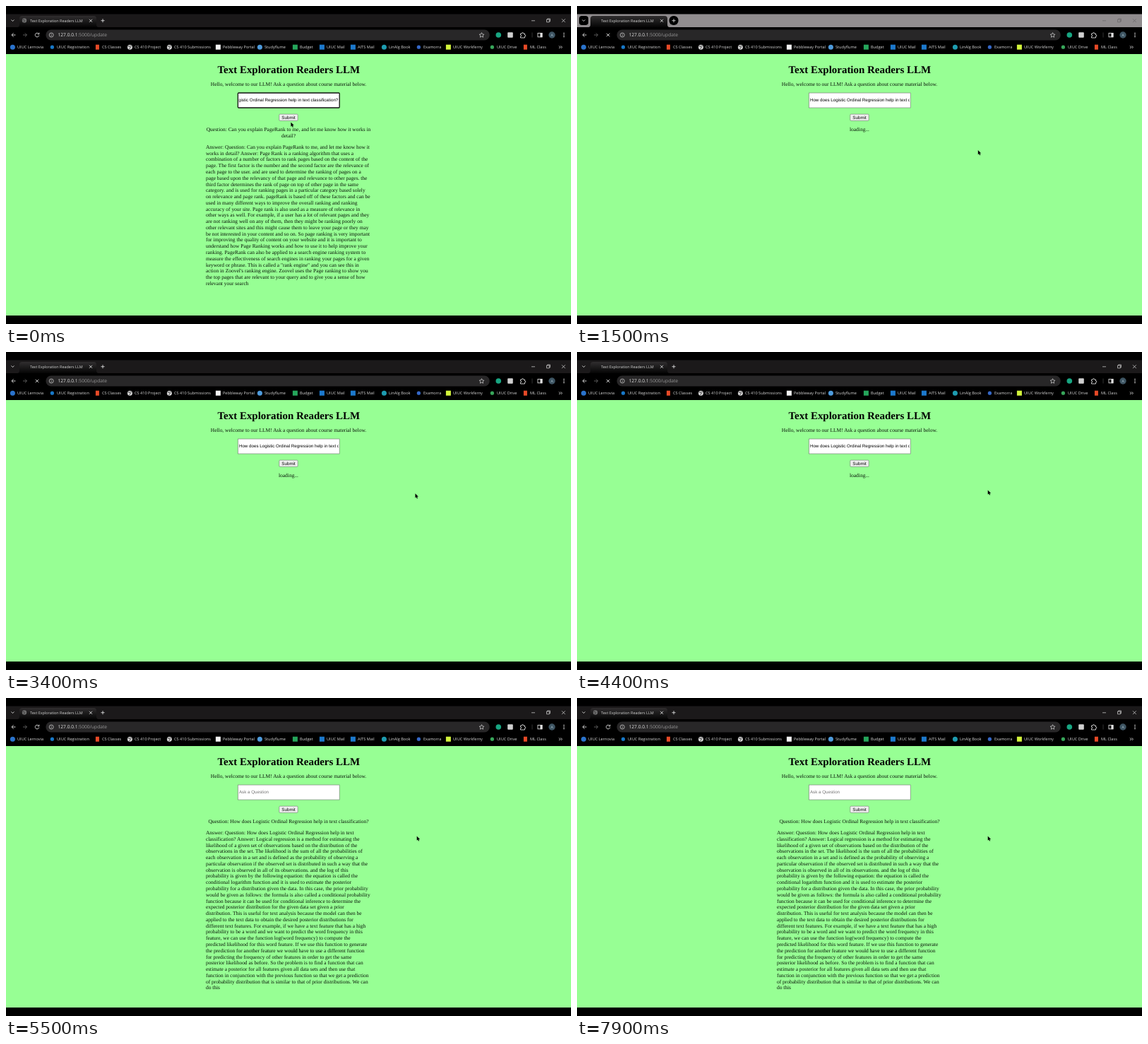
Recreate the animation shown at these times as an HTML page. Size 800 by 450 pixels, loop 8 s.

```html
<!DOCTYPE html>
<html lang="en">
<head>
<meta charset="utf-8">
<title>Browser demo</title>
<style>
  html, body { margin: 0; width: 100%; height: 100%; overflow: hidden; background: #000; }
  svg { display: block; width: 800px; height: 450px; }
  text { white-space: pre; text-rendering: geometricPrecision; }
  .serif { font: 7.475px "Liberation Serif", "Times New Roman", serif; fill: #081408; }
  .h1 { font-size: 14.95px; font-weight: bold; fill: #000; }
  .sans { font: 6.23px "Liberation Sans", Arial, sans-serif; fill: #000; }
  .ui { font: 5.6px "Open Sans", sans-serif; fill: #d6d6d6; }
  .mid { text-anchor: middle; }
  .line { fill: none; stroke: #dcdcdc; stroke-width: .9; }
</style>
</head>
<body>
<svg id="stage" viewBox="0 0 800 450">
  <defs>
    <linearGradient id="tabFill" x2="0" y2="1">
      <stop offset="0" stop-color="#302e2f"/><stop offset="1" stop-color="#050505"/>
    </linearGradient>
    <clipPath id="fieldClip"><rect x="329.6" y="124" width="141.2" height="20"/></clipPath>
  </defs>
  <rect width="800" height="450"/>

  <rect id="strip" y="11.5" width="800" height="18.5"/>
  <g id="chips"><rect x="3" y="14" width="13" height="13" rx="4"/><rect x="130.5" y="14" width="13" height="13" rx="6"/></g>
  <path d="M16 30 Q19 30 19 26 V18 Q19 14 23 14 H124 Q128 14 128 18 V26 Q128 30 131 30Z" fill="url(#tabFill)"/>
  <path class="line" d="M7.5 19.5 L9.5 21.5 L11.5 19.5 M118 18.8 l4 4 m0 -4 l-4 4 M134.5 20.7 h5 m-2.5 -2.5 v5"/>
  <g id="favicon"><circle cx="26" cy="20.5" r="3.2" fill="#6d6d6d"/><path d="M23.6 19.5 h2 l1 1.4 -1.6 2" fill="none" stroke="#333" stroke-width=".8"/></g>
  <text class="ui" x="34" y="22.7" style="font-size:5.45px">Text Exploration Readers LLM</text>
  <path id="controls" class="line" style="stroke-width:.7" d="M744 20.8 h5 M765.5 19 h3.8 v3.8 h-3.8z M766.6 19 v-1 h3.8 v3.8 h-1 M787 18.3 l4.8 4.8 m0 -4.8 l-4.8 4.8"/>

  <rect x="56.4" y="33.6" width="628.4" height="14.8" rx="7.4" fill="#282728"/>
  <path class="line" d="M13.5 41 h-5.5 m2.6 -2.6 l-2.6 2.6 2.6 2.6"/>
  <path class="line" style="stroke:#666" d="M24 41 h5.5 m-2.6 -2.6 l2.6 2.6 -2.6 2.6"/>
  <g class="line">
    <path id="reload" d="M46.4 39.5 A2.8 2.8 0 1 0 46.8 41.6 M46.9 37.7 v2.2 h-2.2"/>
    <path id="stop" d="M41.8 38.8 l4.4 4.4 m0 -4.4 l-4.4 4.4"/>
    <circle cx="64.2" cy="41" r="3" stroke-width=".7"/><path d="M64.2 40.5 v2.1 M64.2 39.2 v.7" stroke-width=".7"/>
    <path d="M673.5 37.7 l1 2.2 2.4 .3 -1.8 1.6 .5 2.4 -2.1 -1.2 -2.1 1.2 .5 -2.4 -1.8 -1.6 2.4 -.3z" stroke-width=".7"/>
    <path d="M728.5 39 h2 q0 -1.5 1 -1.5 t1 1.5 h2 v2 q1.4 0 1.4 1 t-1.4 1 v2 h-6 v-2 q1.3 0 1.3 -1 t-1.3 -1z"/>
    <rect x="753" y="38.4" width="6" height="5.4"/>
  </g>
  <text class="ui" x="73.5" y="43.4" style="font-size:6.65px;fill:#e6e6e6">127.0.0.1<tspan fill="#969696">:5000/update</tspan></text>
  <circle cx="697.3" cy="41" r="3.8" fill="#18a682"/>
  <rect x="710.2" y="37.2" width="7.6" height="7.6" rx="1" fill="#cfcfcf"/>
  <path d="M745 37.5 v7" stroke="#454545" stroke-width=".7"/>
  <rect x="756.4" y="38" width="3" height="6.2" fill="#e0e0e0"/>
  <circle cx="773" cy="41" r="4.7" fill="#3e5563"/>
  <text class="ui mid" x="773" y="42.8" style="font-size:5px;fill:#b4cad6">A</text>
  <g fill="#ddd"><circle cx="790" cy="38.6" r=".8"/><circle cx="790" cy="41" r=".8"/><circle cx="790" cy="43.4" r=".8"/></g>
  <g id="bookmarks"></g>
  <path class="line" d="M783 56.4 l1.8 1.8 -1.8 1.8 m2.6 -3.6 l1.8 1.8 -1.8 1.8"/>

  <rect y="68" width="800" height="370" fill="#97ff94"/>
  <text class="serif mid h1" x="400.3" y="95.2">Text Exploration Readers LLM</text>
  <text class="serif mid" x="400" y="113.4">Hello, welcome to our LLM! Ask a question about course material below.</text>
  <rect id="field" x="328.4" y="123" width="143.8" height="21" fill="#fff"/>
  <g clip-path="url(#fieldClip)"><text id="fieldText" class="sans" y="135.4"></text></g>
  <rect id="button" x="386.8" y="153.1" width="26.4" height="9.2" rx="1.3" stroke="#6d716d" stroke-width=".6"/>
  <text class="sans mid" x="400" y="159.9">Submit</text>
  <text id="loading" class="serif mid" x="400" y="177.1">loading...</text>
  <g id="before" class="serif"></g>
  <g id="after" class="serif"></g>
  <path id="cursor" d="M0 0 V6.2 L1.4 5 L2.4 7.2 L3.5 6.7 L2.5 4.6 H4.4Z"/>
</svg>
<script>
const $ = id => document.getElementById(id);
const LINE = 8.77;
const QUERY = "How does Logistic Ordinal Regression help in text classification?";

const PAGERANK = `Answer: Question: Can you explain PageRank to me, and let me know how it
works in detail? Answer: Page Rank is a ranking algorithm that uses a
combination of a number of factors to rank pages based on the content of the
page. The first factor is the number and the second factor are the relevance of
each page to the user. and are used to determine the ranking of pages on a
page based upon the relevancy of that page and relevance to other pages. the
third factor determines the rank of page on top of other page in the same
category. and is used for ranking pages in a particular category based solely
on relevance and page rank. pageRank is based off of these factors and can be
used in many different ways to improve the overall ranking and ranking
accuracy of your site. Page rank is also used as a measure of relevance in
other ways as well. For example, if a user has a lot of relevant pages and they
are not ranking well on any of them, then they might be ranking poorly on
other relevant sites and this might cause them to leave your page or they may
be not interested in your content and so on. So page ranking is very important
for improving the quality of content on your website and it is important to
understand how Page Ranking works and how to use it to help improve your
ranking. PageRank can also be applied to a search engine ranking system to
measure the effectiveness of search engines in ranking your pages for a given
keyword or phrase. This is called a "rank engine" and you can see this in
action in Zoovel's ranking engine. Zoovel uses the Page ranking to show you
the top pages that are relevant to your query and to give you a sense of how
relevant your search`;

const REGRESSION = `Answer: Question: How does Logistic Ordinal Regression help in text
classification? Answer: Logical regression is a method for estimating the
likelihood of a given set of observations based on the distribution of the
observations in the set. The likelihood is the sum of all the probabilities of
each observation in a set and is defined as the probability of observing a
particular observation if the observed set is distributed in such a way that the
observation is observed in all of its observations. and the log of this
probability is given by the following equation: the equation is called the
conditional logarithm function and it is used to estimate the posterior
probability for a distribution given the data. In this case, the prior probability
would be given as follows: the formula is also called a conditional probability
function because it can be used for conditional inference to determine the
expected posterior distribution for the given data set given a prior
distribution. This is useful for text analysis because the model can then be
applied to the text data to obtain the desired posterior distributions for
different text features. For example, if we have a text feature that has a high
probability to be a word and we want to predict the word frequency in this
feature, we can use the function log(word frequency) to compute the
predicted likelihood for this word feature. If we use this function to generate
the prediction for another feature we would have to use a different function
for predicting the frequency of other features in order to get the same
posterior likelihood as before. So the problem is to find a function that can
estimate a posterior for all features given all data sets and then use that
function in conjunction with the previous function so that we get a prediction
of probability distribution that is similar to that of prior distributions. We can
do this`;

// label, label x, icon shape, icon colour
const BOOKMARKS = [
  ["UIUC Lernovia", 16, "dot", "#2a73cc"], ["UIUC Registration", 72, "small", "#1778c8"],
  ["CS Classes", 136, "bar", "#e84a27"], ["CS 410 Project", 182, "globe", "#d5d5d5"],
  ["CS 410 Submissions", 238, "globe", "#d5d5d5"], ["Pebbleway Portal", 307, "square", "#f4f4f4"],
  ["Studyflume", 366, "dot", "#4e9bdc"], ["Budget", 416, "square", "#25a65b"],
  ["UIUC Mail", 454, "square", "#1c79cc"], ["AITS Mail", 498, "square", "#1c79cc"],
  ["LinAlg Book", 542, "dot", "#1d9cb0"], ["Examorra", 591, "small", "#3568c8"],
  ["UIUC Workferny", 633, "square", "#d3f53b"], ["UIUC Drive", 695, "small", "#38a65a"],
  ["ML Class", 742, "bar", "#e84a27"]
];

function icon(shape, x, color) {
  if (shape === "square" || shape === "bar") {
    const w = shape === "bar" ? 5 : 7;
    return `<rect x="${x - w / 2}" y="54.7" width="${w}" height="7" fill="${color}"/>`;
  }
  const disc = `<circle cx="${x}" cy="58.2" r="${shape === "small" ? 2.6 : 3.5}" fill="${color}"/>`;
  return shape === "globe"
    ? disc + `<path d="M${x - 2.6} 57 h2.4 l1.2 1.4 -1.8 2.2 M${x + .6} 55.6 l1.6 1.6" fill="none" stroke="#222" stroke-width=".9"/>`
    : disc;
}

const textLines = (lines, x, y, cls = "") => lines.map((line, i) =>
  `<text class="${cls}" x="${x}" y="${y + i * LINE}">${line}</text>`).join("");

$("bookmarks").innerHTML = BOOKMARKS.map(([label, x, shape, color]) =>
  icon(shape, x - 6.6, color) + `<text class="ui" x="${x}" y="60.2">${label}</text>`).join("");
$("before").innerHTML =
  textLines(["Question: Can you explain PageRank to me, and let me know how it works in", "detail?"], 400, 177.1, "mid") +
  textLines(PAGERANK.split("\n"), 282.9, 201.9);
$("after").innerHTML =
  textLines(["Question: " + QUERY], 400, 177.1, "mid") + textLines(REGRESSION.split("\n"), 282.9, 193.1);

// time, x, y of the pointer tip
const POINTER = [
  [0, 403.4, 164.5], [300, 399.2, 158.8], [900, 399.2, 158.8], [1400, 567.8, 204], [1900, 567.8, 204],
  [2500, 560.1, 243], [2800, 560.1, 241.5], [3000, 560.1, 241.5], [3500, 581.7, 195.4], [8000, 581.7, 195.4]
];

function pointerAt(t) {
  const i = POINTER.findIndex(p => p[0] > t);
  const [t0, x0, y0] = POINTER[i - 1], [t1, x1, y1] = POINTER[i];
  const u = (t - t0) / (t1 - t0), e = u * u * (3 - 2 * u);
  return [x0 + (x1 - x0) * e, y0 + (y1 - y0) * e];
}

const set = (id, attrs) => Object.entries(attrs).forEach(([k, v]) => $(id).setAttribute(k, v));
const show = (id, on) => set(id, { visibility: on ? "visible" : "hidden" });

function draw(t) {
  const typed = t < 400, answered = t >= 4500, busy = !typed && !answered;
  const inactive = t >= 1300 && t < 3300;
  const hover = t >= 200 && t < 1000;

  set("strip", { fill: inactive ? "#918d8f" : "#1b191a" });
  show("chips", inactive);
  $("controls").style.stroke = inactive ? "#686567" : "#dcdcdc";
  show("favicon", !busy);
  show("reload", !busy);
  show("stop", busy);

  set("field", typed ? { stroke: "#101010", "stroke-width": 1.3, rx: 1 }
                     : { stroke: "#7b857b", "stroke-width": .7, rx: 0 });
  set("fieldText", { x: typed ? 470.3 : 329.9, "text-anchor": typed ? "end" : "start" });
  $("fieldText").style.fill = answered ? "#757575" : "#000";
  $("fieldText").textContent = answered ? "Ask a Question" : QUERY;
  set("button", { fill: hover ? "#dfdfe2" : "#f0f0f0" });

  show("before", typed);
  show("loading", t >= 800 && !answered);
  show("after", answered);
  set("cursor", { transform: `translate(${pointerAt(t)})` });
}

const start = performance.now();
function tick() {
  const t = (performance.now() - start) % 8000;
  draw(Math.floor(t / 100) * 100);
  requestAnimationFrame(tick);
}
tick();
</script>
</body>
</html>
```
